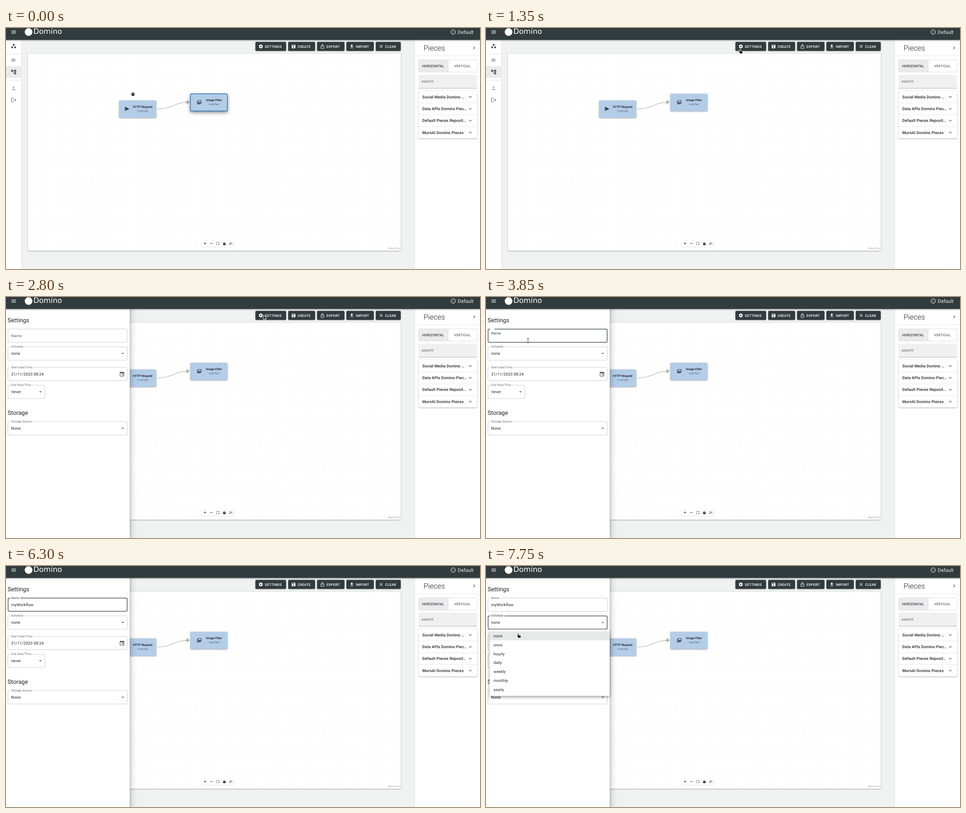
Write an HTML page with a canvas that moves like this. It is 1050x534 px and loops after 8000 ms.

```html
<!DOCTYPE html>
<html lang="en">
<head>
<meta charset="utf-8">
<title>Workflow editor</title>
<style>
html, body { margin: 0; width: 100%; height: 100%; overflow: hidden; background: #f0f2f2; }
canvas { display: block; width: 1050px; height: 534px; }
</style>
</head>
<body>
<canvas id="stage"></canvas>
<script>
const W = 1050, H = 534, LOOP = 8000, STEP = 50;
const DARK = '#323c3e', GREY = '#666', INK = '#212121';
const canvas = document.getElementById('stage');
const ctx = canvas.getContext('2d');
const dpr = window.devicePixelRatio || 1;
canvas.width = W * dpr;
canvas.height = H * dpr;

// Icons on a 24-unit grid
const ICONS = {
  menu: 'M3 6h18v2H3zM3 11h18v2H3zM3 16h18v2H3z',
  group: 'M12 3a4 4 0 1 0 0 8 4 4 0 0 0 0-8zM6 13a4 4 0 1 0 0 8 4 4 0 0 0 0-8zM18 13a4 4 0 1 0 0 8 4 4 0 0 0 0-8z',
  list: 'M3 7h14v2H3zM3 11h14v2H3zM3 15h14v2H3zM19 7h2v2h-2zM19 11h2v2h-2zM19 15h2v2h-2z',
  tree: 'M22 11V3h-7v3H9V3H2v8h7V8h2v10h4v3h7v-8h-7v3h-2V8h2v3z',
  person: 'M12 4a4 4 0 1 0 0 8 4 4 0 0 0 0-8zM4 20v-2c0-2.7 5.3-4 8-4s8 1.3 8 4v2z',
  logout: 'M17 7l-1.4 1.4L18.2 11H8v2h10.2l-2.6 2.6L17 17l5-5zM4 5h8V3H4a2 2 0 0 0-2 2v14a2 2 0 0 0 2 2h8v-2H4z',
  save: 'M17 3H5a2 2 0 0 0-2 2v14a2 2 0 0 0 2 2h14a2 2 0 0 0 2-2V7zM12 19a3 3 0 1 1 0-6 3 3 0 0 1 0 6zM15 9H5V5h10z',
  share: 'M16 5l-1.4 1.4L13 4.8V16h-2V4.8L9.4 6.4 8 5l4-4zM20 10v11a2 2 0 0 1-2 2H6a2 2 0 0 1-2-2V10a2 2 0 0 1 2-2h3v2H6v11h12V10h-3V8h3a2 2 0 0 1 2 2z',
  load: 'M19 9h-4V3H9v6H5l7 7zM5 18v2h14v-2z',
  close: 'M19 6.4L17.6 5 12 10.6 6.4 5 5 6.4 10.6 12 5 17.6 6.4 19 12 13.4 17.6 19 19 17.6 13.4 12z',
  down: 'M16.6 8.6L12 13.2 7.4 8.6 6 10l6 6 6-6z',
  right: 'M10 6L8.6 7.4 13.2 12l-4.6 4.6L10 18l6-6z',
  send: 'M2 21L23 12 2 3v7l15 2-15 2z',
  photos: 'M20 4v12H8V4zM20 2H8a2 2 0 0 0-2 2v12a2 2 0 0 0 2 2h12a2 2 0 0 0 2-2V4a2 2 0 0 0-2-2zM11.5 11.7l1.7 2.3 2.5-3.1L19 15H9zM2 6v14a2 2 0 0 0 2 2h14v-2H4V6z',
  event: 'M19 4h-1V2h-2v2H8V2H6v2H5a2 2 0 0 0-2 2v14a2 2 0 0 0 2 2h14a2 2 0 0 0 2-2V6a2 2 0 0 0-2-2zM19 20H5V9h14zM12 12h5v5h-5z',
  drop: 'M7 10l5 5 5-5z',
  raise: 'M7 14l5-5 5 5z',
  plus: 'M11 4h2v7h7v2h-7v7h-2v-7H4v-2h7z',
  minus: 'M4 11h16v2H4z',
  fit: 'M4 4h6v2H6v4H4zM14 4h6v6h-2V6h-4zM4 14h2v4h4v2H4zM18 14h2v6h-6v-2h4z',
  lock: 'M5 10h3V7a4 4 0 0 1 8 0h-2a2 2 0 0 0-4 0v3h9v11H5zM12 13a2 2 0 1 0 0 4 2 2 0 0 0 0-4z',
  wand: 'M3 19L14 8l2 2L5 21zM16 6l2-2 2 2-2 2zM7 3l1 2 2 1-2 1-1 2-1-2-2-1 2-1zM19 12l1 2 2 1-2 1-1 2-1-2-2-1 2-1z'
};
for (const name in ICONS) ICONS[name] = new Path2D(ICONS[name]);

const HAND = new Path2D('M-2.5-4a.9 .9 0 0 1 1.8 0V-1L2.8-.4Q4 0 4 1L3.4 4.4H-1.4L-4 1.3Q-4 0-2.5 .8z');
const PALM = new Path2D('M-2.3 .4H3L2.4 4.2H-1.2L-3.2 1.8z');
const FINGERS = new Path2D('M-1.9 2L-2.5-2.7M-.4 1L-.6-3.7M1.2 1L1.4-3.4M2.6 2L3.3-2.1M-3.8 .6L-1.5 3.2');
const ARROW = new Path2D('M-3-5V3.5L-1 1.8 .4 4.8 1.8 4.2 .5 1.3H3z');
const BEAM = new Path2D('M-1.5-5H1.5M0-5V5M-1.5 5H1.5');

const clamp01 = v => Math.min(1, Math.max(0, v));
const lerp = (a, b, p) => a + (b - a) * p;
const ramp = (t, from, to) => clamp01((t - from) / (to - from));
const smooth = p => p * p * (3 - 2 * p);

// cubic-bezier(0, 0, .2, 1)
function easeOut(p) {
  let lo = 0, hi = 1;
  for (let i = 0; i < 20; i++) {
    const s = (lo + hi) / 2;
    if (0.6 * (1 - s) * s * s + s ** 3 < p) lo = s; else hi = s;
  }
  return 3 * (1 - lo) * lo * lo + lo ** 3;
}

function setFont(size, weight, spacing, family = 'Roboto') {
  ctx.font = `${weight} ${size}px ${family}, sans-serif`;
  ctx.letterSpacing = spacing + 'px';
  ctx.textRendering = 'geometricPrecision';
}

function text(str, x, y, { size = 8.75, weight = 400, color = INK, align = 'left', spacing = 0, family } = {}) {
  setFont(size, weight, spacing, family);
  ctx.textAlign = align;
  ctx.fillStyle = color;
  ctx.fillText(str, x, y);
  return ctx.measureText(str).width;
}

function rect(x, y, w, h, color) {
  ctx.fillStyle = color;
  ctx.fillRect(x, y, w, h);
}

function box(x, y, w, h, r, { fill, stroke, line = 0.8, shadow } = {}) {
  ctx.beginPath();
  ctx.roundRect(x, y, w, h, r);
  if (fill) {
    ctx.save();
    if (shadow) {
      ctx.shadowOffsetY = shadow[0] * dpr;
      ctx.shadowBlur = shadow[1] * dpr;
      ctx.shadowColor = `rgba(0,0,0,${shadow[2]})`;
    }
    ctx.fillStyle = fill;
    ctx.fill();
    ctx.restore();
  }
  if (stroke) {
    ctx.strokeStyle = stroke;
    ctx.lineWidth = line;
    ctx.stroke();
  }
}

function icon(name, cx, cy, size, color) {
  ctx.save();
  ctx.translate(cx, cy);
  ctx.scale(size / 24, size / 24);
  ctx.translate(-12, -12);
  ctx.fillStyle = color;
  ctx.fill(ICONS[name], 'evenodd');
  ctx.restore();
}

function gear(cx, cy) {
  ctx.save();
  ctx.translate(cx, cy);
  ctx.strokeStyle = '#fff';
  ctx.lineWidth = 2;
  ctx.beginPath();
  ctx.arc(0, 0, 2.6, 0, 7);
  ctx.stroke();
  for (let i = 0; i < 6; i++) {
    rect(-1.1, -4.5, 2.2, 2, '#fff');
    ctx.rotate(Math.PI / 3);
  }
  ctx.restore();
}

function header() {
  box(-10, -10, W + 20, 36.4, 0, { fill: DARK, shadow: [1.2, 3, 0.3] });
  icon('menu', 17, 9, 13.1, '#fff');
  ctx.fillStyle = '#fff';
  ctx.beginPath();
  ctx.arc(50, 9, 8.5, 0, 7);
  ctx.fill();
  text('Domino', 60.8, 13, { size: 16.3, color: '#fff', family: '"DejaVu Sans"' });
  ctx.strokeStyle = '#fff';
  ctx.lineWidth = 1;
  ctx.beginPath();
  ctx.arc(990.8, 9, 5, 0, 7);
  ctx.stroke();
  for (const dx of [-1.9, 1.9]) for (const dy of [-1.6, 1.6]) rect(990.3 + dx, 8.5 + dy, 1.1, 1.1, '#fff');
  text('Default', 1000.8, 12.8, { size: 10.9, color: '#eceeee' });
}

function sidebar() {
  rect(0, 26.4, 34.5, H, '#fff');
  rect(34.3, 26.4, 0.6, H, '#d8d8d8');
  rect(0, 84.3, 34.3, 26.3, '#ebebeb');
  for (const y of [57, 115]) rect(0, y, 34.3, 0.6, '#d0d0d0');
  icon('group', 17, 40, 13.1, '#555');
  icon('list', 17, 71.3, 13.1, '#757575');
  icon('tree', 17, 97.5, 13.1, '#555');
  icon('person', 17, 133.5, 13.1, '#bbb');
  icon('logout', 17, 159.7, 13.1, '#707070');
}

function toolbar(glow) {
  const buttons = [
    ['SETTINGS', 552.5, 68, null], ['CREATE', 625, 59.7, 'save'], ['EXPORT', 689, 60.8, 'share'],
    ['IMPORT', 754, 60.8, 'load'], ['CLEAR', 819, 55.5, 'close']
  ];
  buttons.forEach(([label, x, w, name], i) => {
    const lit = i ? 0 : glow;
    box(x, 30.7, w, 20, 2.2, { fill: DARK, shadow: [0.9 + lit, 2 + 3 * lit, 0.35] });
    if (lit) box(x, 30.7, w, 20, 2.2, { fill: `rgba(255,255,255,${0.23 * lit})` });
    if (name) icon(name, x + 12, 40.8, 10.9, '#fff'); else gear(x + 12, 40.8);
    text(label, x + 20.8, 43.5, { size: 7.66, weight: 500, color: '#fff', spacing: 0.22 });
  });
}

function node(x, y, title, id, name, selected) {
  box(x, y, 82.3, 38.5, 2, { fill: '#b3cde8', shadow: selected ? [3, 8, 0.5] : [0.8, 3, 0.4] });
  if (selected) box(x + 0.2, y + 0.1, 81.9, 38, 2, { stroke: '#1460ab', line: 1.2 });
  icon(name, x + (name === 'send' ? 17.5 : 19.8), y + 18.7, 11, '#111');
  text(title, x + 52.3, y + 16.6, { size: 6.65, weight: 500, color: '#111', align: 'center' });
  text(id, x + 52.3, y + 25.6, { size: 5.47, color: '#536171', align: 'center' });
}

function board(selected) {
  const x0 = 48.2, y0 = 56.9, gap = 10.94;
  box(x0, y0, 826.4, 436.5, 1, { fill: '#fff', shadow: [0.8, 2.5, 0.4] });
  for (let y = y0 + gap; y < 493; y += gap)
    for (let x = x0 + gap; x < 874; x += gap) rect(x - 0.27, y - 0.27, 0.54, 0.54, '#91919a');

  ctx.strokeStyle = ctx.fillStyle = '#adadb1';
  ctx.lineWidth = 1.1;
  ctx.beginPath();
  ctx.moveTo(335, 179.3);
  ctx.bezierCurveTo(371, 179.3, 371, 164.4, 406, 164.4);
  ctx.stroke();
  ctx.beginPath();
  ctx.moveTo(400, 159.3);
  ctx.lineTo(407, 164.4);
  ctx.lineTo(400, 169.5);
  ctx.fill();
  node(250.5, 160.5, 'HTTP Request', '27dd10b0', 'send', false);
  node(408.3, 145.8, 'Image Filter', '7a0d7be2', 'photos', selected);

  box(434, 470.5, 71, 14.3, 0, { fill: '#fff', shadow: [0, 2, 0.2] });
  ['plus', 'minus', 'fit', 'lock', 'wand'].forEach((name, i) => icon(name, 441 + 14.25 * i, 477.6, 9, '#111'));
  text('React Flow', 873, 490.2, { size: 5.47, color: '#999', align: 'right' });
}

function piecesPanel() {
  rect(905, 26.4, 145, H, '#fff');
  rect(905, 26.4, 0.6, H, '#d8d8d8');
  text('Pieces', 925, 49.6, { size: 16.4, weight: 300 });
  icon('right', 1037, 44, 13.1, '#444');
  rect(905, 61.3, 145, 0.6, '#d8d8d8');

  rect(914.2, 70.6, 65, 27, '#ebebeb');
  box(914.2, 70.6, 129.4, 27, 2.2, { stroke: '#d5d5d5' });
  rect(979, 70.6, 0.7, 27, '#d5d5d5');
  const tab = { size: 7.66, weight: 500, spacing: 0.22 };
  text('HORIZONTAL', 921.9, 86.8, { ...tab, color: DARK });
  text('VERTICAL', 992.6, 86.8, { ...tab, color: GREY });

  box(914, 103.6, 129.8, 30.5, [2.2, 2.2, 0, 0], { fill: '#f0f0f0' });
  rect(914, 133.5, 129.8, 0.6, '#8a8a8a');
  text('search', 920.5, 121.4, { color: GREY, spacing: 0.08 });

  box(914, 139.4, 129.8, 105.3, 2, { fill: '#fff', shadow: [0.8, 2.5, 0.4] });
  ['Social Media Domino …', 'Data APIs Domino Piec…', 'Default Pieces Reposit…', 'MurnAI Domino Pieces'].forEach((label, i) => {
    const y = 139.4 + 26.3 * i;
    if (i) rect(914, y, 129.8, 0.6, '#d8d8d8');
    text(label, 922.3, y + 16.2, { weight: 500, spacing: 0.08 });
    icon('down', 1028.4, y + 13.3, 13.1, '#555');
  });
}

function field({ label, value = '', x = 4, y, w = 265, mark, focus, hover, shrink = 1, caret }) {
  const stroke = focus ? DARK : hover ? INK : '#c0c0c0';
  const inset = focus ? 0.6 : 0.3;
  box(x + inset, y + inset, w - 2 * inset, 30.4 - 2 * inset, 2.2, { stroke, line: focus ? 1.3 : 0.8 });
  const size = lerp(8.75, 6.56, shrink);
  if (shrink > 0) {
    setFont(size, 400, 0.06);
    rect(x + 5.2, y - 1, (ctx.measureText(label).width + 4.4) * shrink, 3, '#fff');
  }
  text(label, x + 7.6, y + lerp(18, 2.2, shrink), { size, color: focus ? DARK : GREY, spacing: 0.06 });
  const width = text(value, x + 7.6, y + 18.4, { spacing: 0.08 });
  if (caret) rect(x + 7.8 + width, y + 10, 0.7, 10.6, '#000');
  if (mark) icon(mark, x + w - (mark === 'event' ? 12 : 10.3), y + 15.2, 13.1, '#555');
}

const KEY_TIMES = [4600, 4700, 5050, 5300, 5450, 5600, 5700, 5900, 5950, 6100];

function drawer(t) {
  if (t < 2534) return;
  ctx.save();
  ctx.beginPath();
  ctx.rect(0, 26.4, W, H);
  ctx.clip();
  ctx.translate(274 * (easeOut(ramp(t, 2534, 2759)) - 1), 0);
  box(-20, -20, 294, H + 40, 0, { fill: '#fff', shadow: [5, 16, 0.28] });
  box(-20, -20, 294, H + 40, 0, { fill: '#fff', shadow: [3, 6, 0.2] });

  const picking = t >= 7100;
  const typed = KEY_TIMES.filter(k => k <= t).length;
  text('Settings', 3.6, 55.6, { size: 13.1 });
  text('Storage', 3.6, 261, { size: 13.1 });
  field({
    label: 'Name', value: 'myWorkflow'.slice(0, typed), y: 70.5,
    focus: t >= 3850 && !picking,
    hover: (t >= 3050 && t < 3200) || (t >= 3500 && t < 3850),
    shrink: easeOut(ramp(t, 3820, 4050)),
    caret: t >= 3900 && t < 6300
  });
  field({ label: 'Schedule', value: 'none', y: 110, mark: picking ? 'raise' : 'drop', focus: picking, hover: t >= 6900 });
  field({ label: 'Start Date/Time', value: '21/11/2023 08:24', y: 155.4, mark: 'event' });
  field({ label: 'End Date/Time', value: 'never', y: 195, w: 82.5, mark: 'drop' });
  field({ label: 'Storage Source', value: 'None', y: 275.7, mark: 'drop' });
  ctx.restore();
}

function scheduleMenu(t) {
  const p = easeOut(ramp(t, 7130, 7400));
  if (!p) return;
  ctx.save();
  ctx.globalAlpha = p;
  ctx.translate(141, 140.5);
  ctx.scale(lerp(0.75, 1, p), lerp(0.56, 1, p));
  ctx.translate(-141, -140.5);
  box(8, 140.5, 266, 147.3, 2.2, { fill: '#fff', shadow: [2.5, 7, 0.4] });
  rect(8, 144.9, 266, 19.75, '#e7e8e8');
  ['none', 'once', 'hourly', 'daily', 'weekly', 'monthly', 'yearly'].forEach((label, i) =>
    text(label, 16.8, 158 + 19.75 * i, { spacing: 0.08 }));
  ctx.restore();
}

// time, x, y, pointer shape
const TRACK = [
  [0, 281.2, 146.3, 'grab'], [150, 281.2, 146.3, 'grab'], [500, 428.5, 94, 'grab'], [600, 428.5, 94, 'grab'],
  [1350, 564.3, 52, 'hand'], [2250, 564.3, 52, 'hand'], [2550, 584.8, 43.6, 'hand'], [2700, 584, 44, 'arrow'],
  [2800, 573.5, 45.8, 'arrow'], [3050, 93, 92, 'beam'], [3100, 93, 92, 'beam'], [3200, 93, 106, 'arrow'],
  [3400, 93, 106, 'arrow'], [3550, 93, 96.5, 'beam'], [4650, 93, 96.5, ''], [6600, 93, 94, ''],
  [6650, 92, 95, 'beam'], [6850, 84, 112, 'hand'], [7050, 79.5, 134.3, 'hand'], [7150, 79.5, 134.3, 'arrow'],
  [7450, 79.5, 134.3, 'arrow'], [7600, 75, 147, 'hand'], [7750, 73, 154.5, 'hand'], [LOOP, 73, 154.5, 'hand']
];

function pointer(t) {
  const i = TRACK.findIndex(k => k[0] > t);
  const a = TRACK[i - 1], b = TRACK[i], shape = a[3];
  if (!shape) return;
  const p = smooth(ramp(t, a[0], b[0]));
  ctx.save();
  ctx.translate(lerp(a[1], b[1], p), lerp(a[2], b[2], p));
  ctx.lineCap = ctx.lineJoin = 'round';
  ctx.fillStyle = '#1c1c1c';
  const outline = (path, width, color) => {
    ctx.lineWidth = width;
    ctx.strokeStyle = color;
    ctx.stroke(path);
  };
  if (shape === 'beam') {
    outline(BEAM, 1.8, '#fff');
    outline(BEAM, 0.8, '#111');
  } else if (shape === 'grab') {
    outline(PALM, 1.4, '#fff');
    outline(FINGERS, 2, '#fff');
    ctx.fill(PALM);
    outline(FINGERS, 1.1, '#1c1c1c');
  } else {
    const path = shape === 'hand' ? HAND : ARROW;
    outline(path, 1.8, '#fff');
    ctx.fill(path);
  }
  ctx.restore();
}

function draw(t) {
  ctx.setTransform(dpr, 0, 0, dpr, 0, 0);
  rect(0, 0, W, H, '#f0f2f2');
  board(t < 700);
  toolbar(ramp(t, 2250, 2500) * (1 - ramp(t, 2560, 2800)));
  sidebar();
  piecesPanel();
  drawer(t);
  scheduleMenu(t);
  header();
  pointer(t);
}

let shown = -1;
function tick() {
  const t = Math.floor(performance.now() % LOOP / STEP) * STEP;
  if (t !== shown) draw(shown = t);
  requestAnimationFrame(tick);
}
tick();
</script>
</body>
</html>
```
